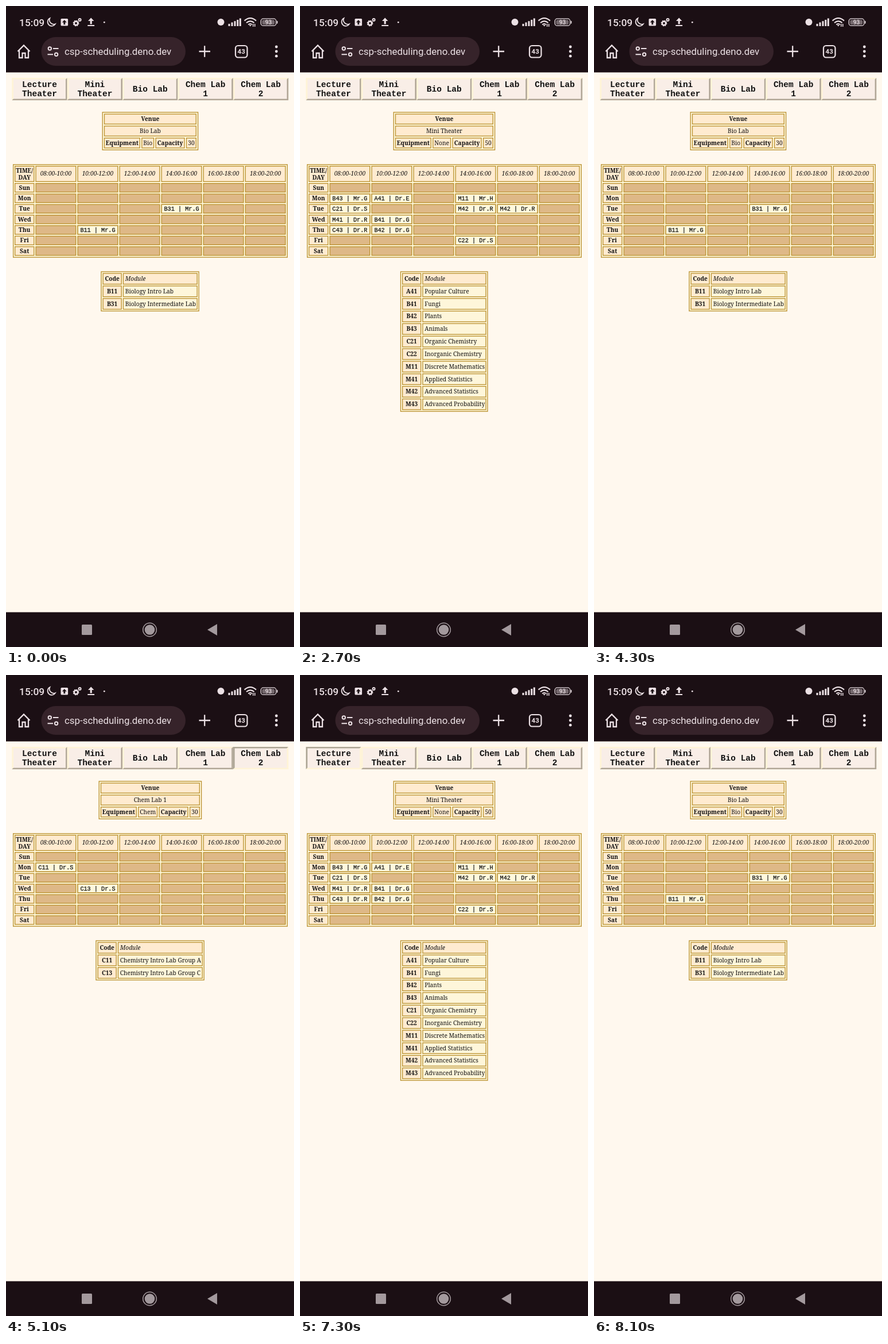
An HTML page for the animation above (9000 ms loop, 502 by 1115 pixels).

```html
<!DOCTYPE html>
<html lang="en">
<head>
<meta charset="utf-8">
<title>Room schedule</title>
<style>
html, body { margin: 0; width: 100%; height: 100%; overflow: hidden; background: #fff8ee; }
svg { display: block; }
text { fill: #111; font: 10.2px "Noto Serif", serif; }
.mid { text-anchor: middle; }
.b { font-weight: 700; }
.i { font-style: italic; }
.slot { font: 10.2px "Liberation Mono", monospace; stroke: #111; stroke-width: .25; }
.tab { font: 700 14.5px "Liberation Mono", monospace; }
.ui { font-family: Roboto, sans-serif; fill: #ece1e5; }
.line { fill: none; stroke: #ece1e5; stroke-width: 2.3; }
.fill { fill: #ece1e5; }
</style>
</head>
<body>
<svg id="stage" width="502" height="1115" viewBox="0 0 502 1115">
  <rect width="502" height="1115" fill="#fff8ee"/>
  <g id="page"></g>
  <rect width="502" height="115.5" fill="#1b0f14"/>
  <rect y="1054.5" width="502" height="61" fill="#1b0f14"/>

  <g id="status">
    <text class="ui" x="23" y="34.5" style="font-size:17.4px;font-weight:500">15:09</text>
    <path class="line" style="stroke-width:1.7" d="M76.5 21.2A7.2 7.2 0 1 0 86 31.2A7.4 7.4 0 0 1 76.5 21.2Z"/>
    <rect class="fill" x="95.5" y="22" width="12.6" height="12.6" rx="1.6"/>
    <path d="M101.8 24.3l4 4.2h-2.6v3.8h-2.8v-3.8h-2.6z" fill="#1b0f14"/>
    <circle cx="122" cy="30" r="3.2" class="line" style="stroke-width:2.6"/>
    <circle cx="122" cy="30" r="4.6" class="line" style="stroke-width:1.6" stroke-dasharray="2 1.6"/>
    <circle cx="128.6" cy="24" r="2" class="line" style="stroke-width:2"/>
    <path class="fill" d="M148.2 20.5l5.2 5.6h-3.6v5.4h-3.2v-5.4H143zM142.3 33h11.8v2h-11.8z"/>
    <circle class="fill" cx="171.3" cy="28.3" r="1.4"/>
    <circle class="fill" cx="374.5" cy="28" r="6"/>
    <path class="line" style="stroke-width:3" d="M389 35v-4M394 35v-6.4M399 35v-8.8M403.800 35v-11M408.300 35v-13.400"/>
    <path class="line" style="stroke-width:2.1" d="M415.600 25.600q10.200-8.800 20.400 0M419 29.200q6.800-5.600 13.600 0M422.300 32.300q3.500-2.600 6.600 0"/>
    <path class="fill" d="M423.500 33l2.400 2.600 2.200-2.600zM430 31h1.500v5h-1.500zM433 31h1.500v5h-1.500z"/>
    <rect x="444.300" y="22.200" width="26.500" height="12" rx="4" class="line" style="stroke-width:1.300"/>
    <rect x="446.300" y="24.200" width="22" height="8" rx="2.200" fill="#75696e"/>
    <rect class="fill" x="472" y="25.800" width="1.500" height="5" rx=".7"/>
    <text class="ui mid" x="457.500" y="31.800" style="font-size:10px;font-weight:500">93</text>
  </g>

  <g id="toolbar">
    <path class="line" d="M23 77v13h5.500v-8h5v8H39V77M20.500 79L31 68.500L41.500 79"/>
    <rect x="61.500" y="54" width="251.500" height="50" rx="25" fill="#36232a"/>
    <g class="line" style="stroke-width:2">
      <circle cx="76.300" cy="74" r="2.700"/>
      <circle cx="87.600" cy="84.300" r="2.700"/>
      <path d="M82 74h9.500M72.500 84.300H82"/>
    </g>
    <text class="ui" x="102" y="85.300" style="font-size:16.900px">csp-scheduling.deno.dev</text>
    <path class="line" d="M336.500 79h19.500M346.200 69.200v19.500"/>
    <rect x="400" y="69" width="20.500" height="20.500" rx="4.500" class="line" style="stroke-width:2.200"/>
    <text class="ui mid" x="410.200" y="83.400" style="font-size:11.500px;font-weight:700">43</text>
    <g class="fill">
      <circle cx="471.300" cy="71" r="2.400"/>
      <circle cx="471.300" cy="79" r="2.400"/>
      <circle cx="471.300" cy="87.200" r="2.400"/>
    </g>
  </g>

  <g id="nav" fill="#a3999d">
    <rect x="132" y="1076" width="18" height="18" rx="1.500"/>
    <circle cx="250.500" cy="1085" r="8.800"/>
    <circle cx="250.500" cy="1085" r="11.800" fill="none" stroke="#a3999d" stroke-width="1.500"/>
    <path d="M351 1085l17-10v20z"/>
  </g>
</svg>
<script>
const NS = 'http://www.w3.org/2000/svg';
const page = document.getElementById('page');
const MID = 251.4, LOOP = 9000;
const CREAM = '#fff8dc', HEAD = '#ffebd0', EMPTY = '#deb887', GOLD = '#b98f2c';
const TABS = ['Lecture|Theater', 'Mini|Theater', 'Bio Lab', 'Chem Lab|1', 'Chem Lab|2'];
const DAYS = ['Sun', 'Mon', 'Tue', 'Wed', 'Thu', 'Fri', 'Sat'];

// gear and seats: text and cell width; list: table edges;
// slots: day digit, column digit, module code, teacher
const VENUES = [
  { name: 'Lecture Theater', gear: ['None', 32], seats: ['100', 23.5], list: [135.8, 367],
    slots: ['10M13 Mr.R', '11L02 Mr.T', '13M03 Mr.R', '20B01 Dr G', '21M02 Mr.R', '23L01 Mr.T',
      '24M16 Dr.R', '30M12 Mr.R', '31A02 Dr.E', '32M15 Dr.R', '40C01 Dr.S', '41A01 Dr.E',
      '42M14 Dr.R', '43M01 Dr.R'],
    mods: ['A01 Sociology and Anthropology 1', 'A02 Sociology and Anthropology 2',
      'B01 Introduction to Biology', 'C01 Introduction to Chemistry', 'L01 Linguistics 1',
      'L02 Linguistics 2', 'M01 Mathematical Methods for Scientists 1',
      'M02 Mathematical Methods for Scientists 2', 'M03 Introductory Calculus',
      'M12 Combinatorics and Graph Theory', 'M13 Multivariate Calculus',
      'M14 Numerical Analysis', 'M15 Real Analysis', 'M16 Linear Algebra'] },
  { name: 'Mini Theater', gear: ['None', 32], seats: ['50', 18], list: [175.3, 327.6],
    slots: ['10B43 Mr.G', '11A41 Dr.E', '13M11 Mr.H', '20C21 Dr.S', '23M42 Dr.R', '24M42 Dr.R',
      '30M41 Dr.R', '31B41 Dr.G', '40C43 Dr.R', '41B42 Dr.G', '53C22 Dr.S'],
    mods: ['A41 Popular Culture', 'B41 Fungi', 'B42 Plants', 'B43 Animals',
      'C21 Organic Chemistry', 'C22 Inorganic Chemistry', 'M11 Discrete Mathematics',
      'M41 Applied Statistics', 'M42 Advanced Statistics', 'M43 Advanced Probability'] },
  { name: 'Bio Lab', gear: ['Bio', 22], seats: ['30', 18], list: [165.8, 336.8],
    slots: ['23B31 Mr.G', '41B11 Mr.G'],
    mods: ['B11 Biology Intro Lab', 'B31 Biology Intermediate Lab'] },
  { name: 'Chem Lab 1', gear: ['Chem', 34], seats: ['30', 18], list: [156.8, 345.8],
    slots: ['10C11 Dr.S', '31C13 Dr.S'],
    mods: ['C11 Chemistry Intro Lab Group A', 'C13 Chemistry Intro Lab Group C'] },
  { name: 'Chem Lab 2', gear: ['Chem', 34], seats: ['30', 18], list: [156.8, 345.8],
    slots: ['10C12 Dr.S', '31C14 Dr.S', '23C31 Dr.S'],
    mods: ['C12 Chemistry Intro Lab Group B', 'C14 Chemistry Intro Lab Group D',
      'C31 Chemistry Intermediate Lab'] }
];

// time in ms, venue shown, tab held down (-1 for none)
const STEPS = [
  [0, 2, -1], [1100, 2, 0], [1500, 0, -1], [2000, 0, 1], [2300, 1, -1], [3500, 1, 2],
  [3800, 2, -1], [4400, 2, 3], [4600, 3, -1], [4900, 3, 4], [5200, 4, -1], [5600, 4, 3],
  [5800, 3, -1], [6100, 3, 2], [6300, 2, -1], [6600, 2, 1], [6800, 1, -1], [7100, 1, 0],
  [7400, 0, -1], [7700, 0, 2], [7900, 2, -1]
];

function add(parent, tag, attrs, content) {
  const el = document.createElementNS(NS, tag);
  for (const key in attrs) el.setAttribute(key, attrs[key]);
  if (content) el.textContent = content;
  return parent.appendChild(el);
}

function box(g, x, y, w, h, fill) {
  add(g, 'rect', { x: x + .65, y: y + .65, width: w - 1.3, height: h - 1.3,
    fill, stroke: GOLD, 'stroke-width': 1.3 });
}

function label(g, x, y, text, cls = 'mid') {
  add(g, 'text', { x, y, class: cls }, text);
}

function cell(g, x, y, w, h, fill, text, cls = 'mid') {
  box(g, x, y, w, h, fill);
  const left = !cls.includes('mid');
  if (text) label(g, left ? x + 4 : x + w / 2, y + h / 2 + 3.4, text, cls);
}

function drawVenue(g, v) {
  const cells = [['Equipment', 63, 'mid b'], v.gear, ['Capacity', 51.2, 'mid b'], v.seats];
  const inner = cells.reduce((sum, c) => sum + c[1], 6.9);
  let x = MID - inner / 2;
  box(g, x - 3.3, 184.2, inner + 6.6, 66.8, CREAM);
  cell(g, x, 187.4, inner, 18.6, HEAD, 'Venue', 'mid b');
  cell(g, x, 208.2, inner, 18.6, HEAD, v.name);
  for (const [text, w, cls] of cells) {
    cell(g, x, 229, w, 18.6, HEAD, text, cls);
    x += w + 2.3;
  }
}

function drawSlots(g, v) {
  for (const s of v.slots) {
    const x = 51.4 + 73.05 * s[1], y = 308 + 18.35 * s[0];
    cell(g, x, y, 71, 16.3, CREAM, s.slice(2, 5) + ' | ' + s.slice(6), 'mid slot');
  }
}

function drawModules(g, v) {
  const [x0, x1] = v.list, pitch = 21.83, top = 464.5;
  box(g, x0 - .5, 461.5, x1 - x0 + .5, pitch * (v.mods.length + 1) + 4.2, CREAM);
  ['Code Module', ...v.mods].forEach((m, i) => {
    const [code, ...rest] = m.split(' '), y = top + i * pitch;
    cell(g, x0 + 2.7, y, 33.3, 20, HEAD, code, 'mid b');
    cell(g, x0 + 38, y, x1 - x0 - 41, 20, i ? '#fef6da' : HEAD, rest.join(' '), i ? 'l' : 'i');
  });
}

function drawWeek(g) {
  box(g, 12, 275.2, 479, 162.6, CREAM);
  box(g, 15, 278, 34.4, 28, HEAD);
  label(g, 32.2, 289.5, 'TIME/', 'mid b');
  label(g, 32.2, 301.5, 'DAY', 'mid b');
  const hour = n => String(n).padStart(2, '0') + ':00';
  for (let c = 0; c < 6; c++) {
    const x = 51.4 + 73.05 * c;
    cell(g, x, 278, 71, 28, HEAD, hour(8 + 2 * c) + '-' + hour(10 + 2 * c), 'mid i');
    for (let d = 0; d < 7; d++) box(g, x, 308 + 18.35 * d, 71, 16.3, EMPTY);
  }
  DAYS.forEach((day, d) => cell(g, 15, 308 + 18.35 * d, 34.4, 16.3, HEAD, day, 'mid b'));
}

function drawTab(name, i) {
  const x = 10.4 + 96.4 * i, y = 125, w = 96.2, h = 39, b = 2.6;
  const slant = `L${x + w - b} ${y + b}H${x + b}V${y + h - b}L${x} ${y + h}`;
  add(page, 'rect', { x, y, width: w, height: h, fill: '#f9eee7' });
  const upper = add(page, 'path', { d: `M${x} ${y}H${x + w}${slant}Z` });
  const lower = add(page, 'path', {
    d: `M${x + w} ${y + h}H${x}L${x + b} ${y + h - b}H${x + w - b}V${y + b}L${x + w} ${y}Z` });
  const lines = name.split('|');
  lines.forEach((text, n) =>
    label(page, x + w / 2, 149 + 16 * (n - (lines.length - 1) / 2), text, 'mid tab'));
  return down => {
    upper.setAttribute('fill', down ? '#aca594' : '#fff4d6');
    lower.setAttribute('fill', down ? '#fff4d6' : '#b1a797');
  };
}

const setTab = TABS.map(drawTab);
drawWeek(page);
const views = VENUES.map(v => {
  const g = add(page, 'g', {});
  drawVenue(g, v);
  drawSlots(g, v);
  drawModules(g, v);
  return g;
});

const start = performance.now();
let current;

function render() {
  const t = (performance.now() - start) % LOOP;
  const step = STEPS.findLast(s => s[0] <= t);
  if (step !== current) {
    current = step;
    views.forEach((g, i) => g.setAttribute('display', i === step[1] ? 'inline' : 'none'));
    setTab.forEach((set, i) => set(i === step[2]));
  }
  requestAnimationFrame(render);
}
render();
</script>
</body>
</html>
```
